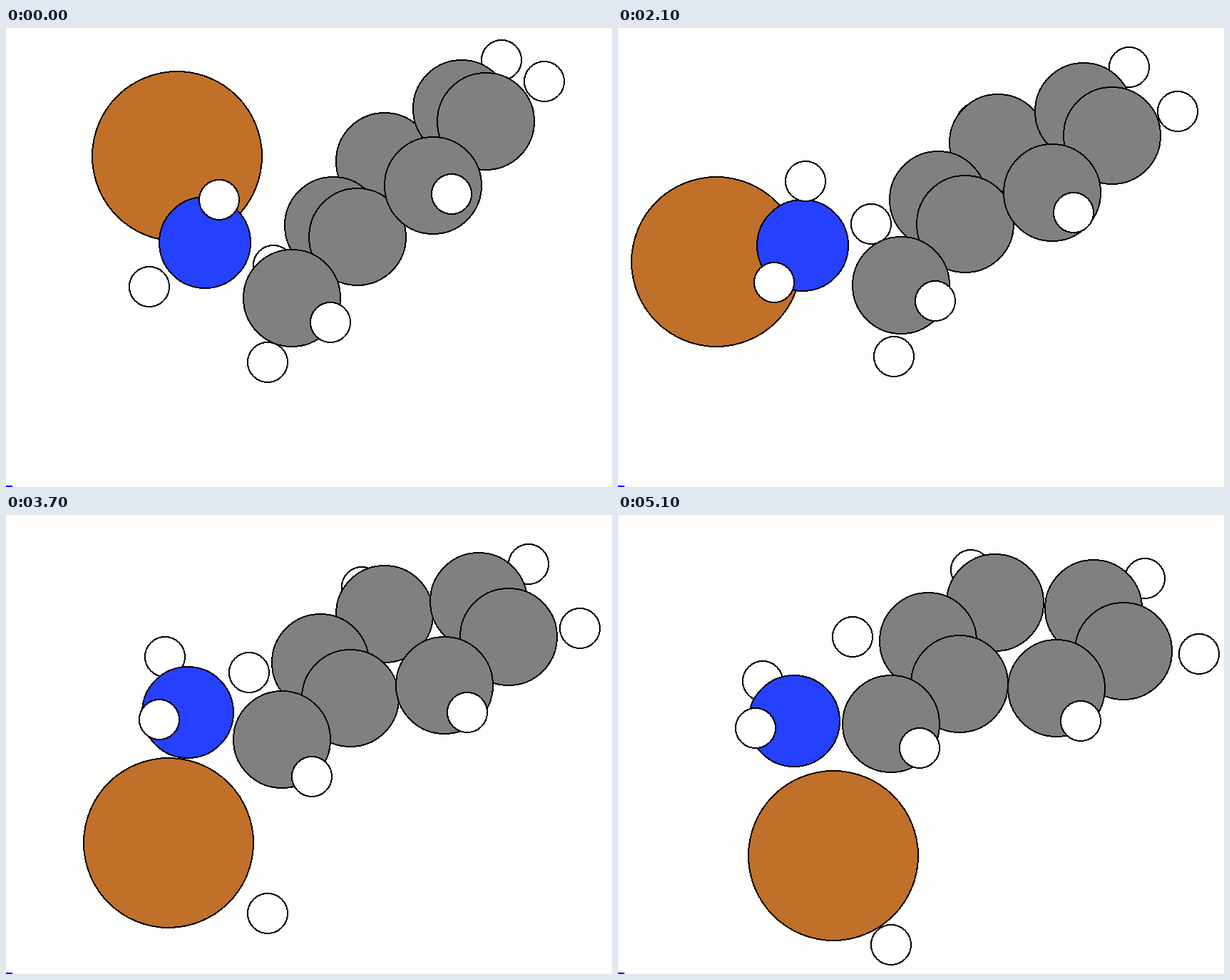
These frames come from a looping animation (850 by 644 pixels, 5.2 s). An HTML page:

```html
<!DOCTYPE html>
<html lang="en">
<head>
<meta charset="utf-8">
<title>Molecule</title>
<style>
  html, body { margin: 0; width: 100%; height: 100%; overflow: hidden; background: #fdfdfb; }
  svg { display: block; width: 850px; height: 644px; }
  circle { stroke: #000; stroke-width: 2; shape-rendering: crispEdges; }
</style>
</head>
<body>
<svg id="stage" viewBox="0 0 850 644">
  <rect y="642" width="9" height="2" fill="#00f"/>
</svg>
<script>
const LOOP = 5200, LAST = 5100, STEP = 100;
const HIT = 2600; // the heavy atom swings under the blue one
const stage = document.getElementById('stage');
const mix = (a, b, k) => a.map((v, n) => v + (b[n] - v) * k);

// Straight runs between collisions, each given as [time, x, y]
const path = (...keys) => t => {
  let i = 1;
  while (i < keys.length - 1 && t >= keys[i][0]) i++;
  const [a, b] = [keys[i - 1], keys[i]];
  return mix(a, b, (t - a[0]) / (b[0] - a[0])).slice(1);
};

// The ring turns ever faster until the hit, then more evenly
const turn = (from, hit, to) => t => t < HIT
  ? mix(from, hit, (t / HIT) ** 2)
  : mix(hit, to, ((t - HIT) / (LAST - HIT)) ** 1.4);

// The hexagon is its centre plus two corner vectors
const centre = turn([565.5, 203.5], [573.5, 192], [572, 183]);
const back = turn([-34, -17], [-41, -45], [-43, -60]);
const side = turn([107.5, -73], [129, -29], [137, 7]);
const corner = (a, b, reach = 1) => t => {
  const u = back(t), v = side(t);
  return centre(t).map((c, n) => c + reach * (a * u[n] + b * v[n]));
};

const heavy = path(
  [0, 240, 180], [1300, 172, 244], [2100, 138, 328], [2500, 128, 416], [HIT, 150, 440],
  [3200, 250, 454], [3700, 228, 460], [4200, 282, 468], [LAST, 302, 478]);
const low = path(
  [0, 367, 469], [900, 375, 500], [1300, 379, 469], [HIT, 393, 457],
  [3200, 381, 523], [4200, 351, 593], [LAST, 383, 603]);
const nitrogen = path([0, 279, 301], [HIT, 255, 307], [3200, 259, 273], [LAST, 247, 289]);
const upper = path(
  [0, 299, 241], [1300, 289, 223], [HIT, 247, 211],
  [3200, 235, 185], [4200, 209, 213], [LAST, 203, 233]);
const lower = path([0, 201, 363], [2100, 219, 357], [HIT, 233, 301], [3200, 223, 283], [LAST, 193, 299]);
const arm = path([0, 401, 379], [HIT, 397, 357], [3200, 383, 329], [4200, 389, 301], [LAST, 383, 293]);
const armTip = path([0, 455, 413], [HIT, 443, 377], [3200, 427, 387], [4200, 431, 347], [LAST, 423, 327]);

const atoms = [];
function atom(path, r, fill) {
  const el = document.createElementNS('http://www.w3.org/2000/svg', 'circle');
  el.setAttribute('r', r);
  el.setAttribute('fill', fill);
  stage.append(el);
  atoms.push({ el, path, odd: (r + 1) % 2 });
  return el;
}
const hydrogen = path => atom(path, 28, '#fff');
const carbon = path => atom(path, 68, '#808080');

// Ring corners from back to front; the fifth carries the arm
const ring = [[1, 0], [1, 1], [0, -1], [0, 1], [-1, -1], [-1, 0]];
const tip = ([a, b]) => corner(a, b, 1.77);

hydrogen(low);
ring.slice(0, 4).map(tip).forEach(hydrogen);
atom(heavy, 119, '#c07029');
const blue = atom(nitrogen, 64, '#2640ff');
const turning = hydrogen(upper);
const near = hydrogen(lower);
ring.forEach(([a, b]) => carbon(corner(a, b)));
hydrogen(tip(ring[5]));
carbon(arm);
hydrogen(armTip);

// Centres sit on a two-pixel grid
const snap = (v, odd) => 2 * Math.round((v - odd) / 2) + odd;

let shown = -1;
function draw(t) {
  for (const { el, path, odd } of atoms) {
    const [x, y] = path(t);
    el.setAttribute('cx', snap(x, odd));
    el.setAttribute('cy', snap(y, odd));
  }
  // This hydrogen swings round behind the blue atom
  stage.insertBefore(turning, t < HIT ? near : blue);
}

const start = performance.now();
function tick() {
  const t = Math.floor((performance.now() - start) % LOOP / STEP) * STEP;
  if (t !== shown) draw(shown = t);
  requestAnimationFrame(tick);
}
tick();
</script>
</body>
</html>
```
